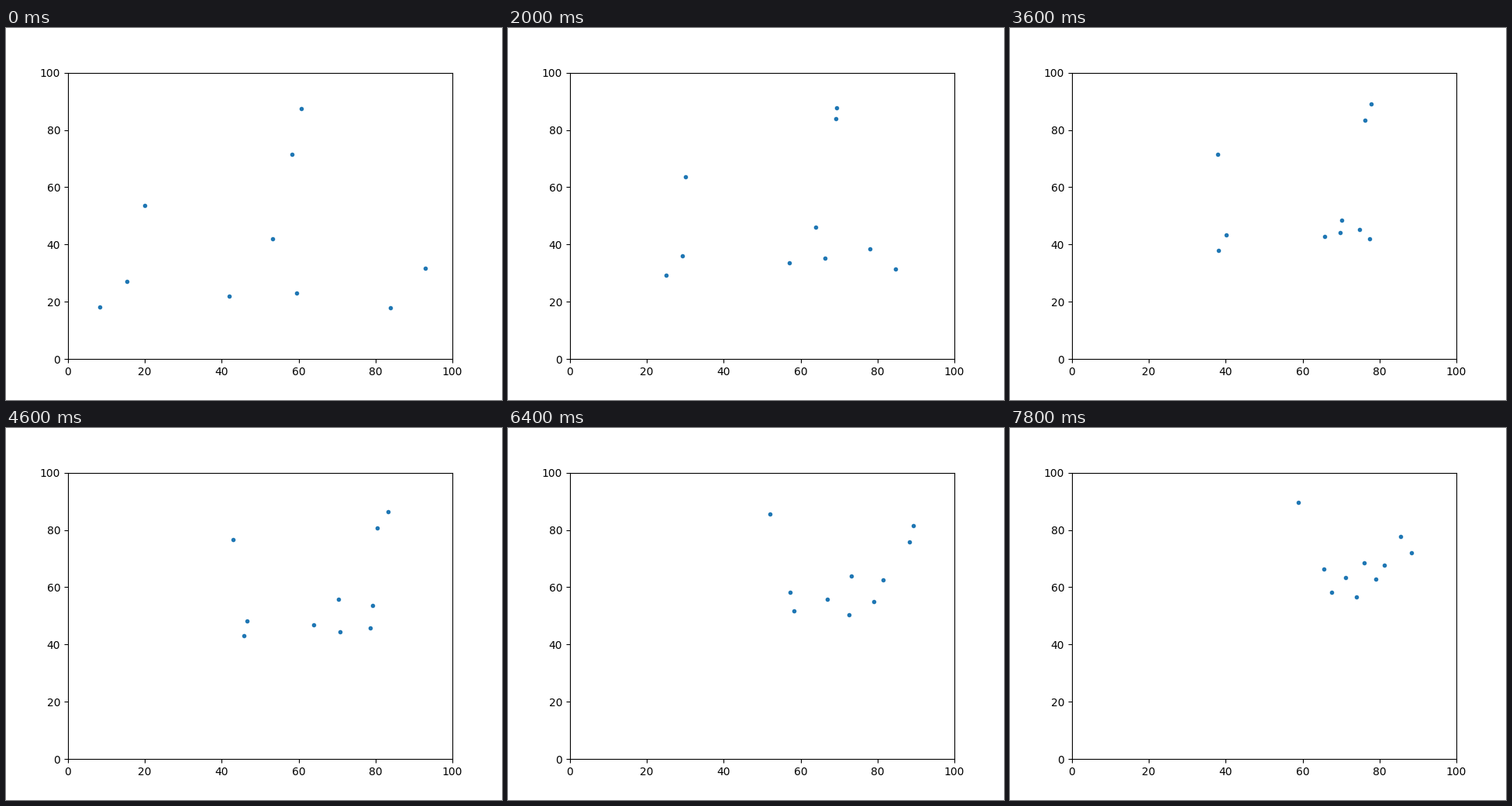
Write a matplotlib script that moves like this. It is 640 px wide and 480 px high and loops after 8000 ms.

```python
import numpy as np
import matplotlib.pyplot as plt
from matplotlib.animation import FuncAnimation

FRAMES = 40
STEP_MS = 200
STEPS = np.arange(FRAMES)
WALL = 90.6       # birds turn back here, short of the frame
REBOUND = 0.54    # speed per step after turning back


def glide(start, velocity):
    """Straight flight that turns back slowly at the wall, per axis."""
    start, velocity = np.array(start), np.array(velocity)
    ahead = start + velocity * STEPS[:, None]
    late = np.maximum(ahead - WALL, 0) / velocity
    return np.minimum(ahead, WALL) - REBOUND * late


def curve(steps, points):
    """Smooth flight through a few points, sampled at every step."""
    steps, points = np.array(steps), np.array(points)
    slopes = np.gradient(points, steps, axis=0)
    i = np.clip(np.searchsorted(steps, STEPS, side="right") - 1, 0, len(steps) - 2)
    h = (steps[i + 1] - steps[i])[:, None]
    u = (STEPS - steps[i])[:, None] / h
    ease = u * u * (3 - 2 * u)
    bend = u * (1 - u) * h * ((1 - u) * slopes[i] - u * slopes[i + 1])
    return points[i] + ease * (points[i + 1] - points[i]) + bend


# Three birds that fly on their own.
loners = [
    glide((19.97, 53.52), (1, 1)),
    glide((58.27, 71.48), (1.09, 1.25)),
    glide((60.69, 87.45), (0.86, 0.65)),
]

# A pair that comes in from the left.
PAIR_STEPS = (0, 23, 39)
pair = [
    curve(PAIR_STEPS, [(8.3, 18.2), (45.8, 43.1), (67.5, 58.2)]),
    curve(PAIR_STEPS, [(15.3, 27.1), (46.6, 48.2), (65.5, 66.3)]),
]

# Five birds that gather, push apart and drift up together.
FLOCK_STEPS = (0, 10, 18, 23, 39)
flock = [curve(FLOCK_STEPS, points) for points in (
    [(42.0, 22.1), (57.1, 33.6), (65.7, 42.8), (63.9, 46.9), (71.2, 63.4)],
    [(53.2, 42.0), (63.9, 46.0), (70.2, 48.5), (70.4, 55.8), (76.0, 68.5)],
    [(59.5, 23.1), (66.3, 35.2), (69.8, 44.2), (70.8, 44.4), (74.0, 56.6)],
    [(83.9, 17.9), (84.7, 31.4), (77.4, 42.0), (78.6, 45.8), (79.0, 62.8)],
    [(92.9, 31.7), (78.0, 38.5), (74.8, 45.2), (79.2, 53.6), (81.3, 67.7)],
)]

paths = np.array(loners + pair + flock)

fig, ax = plt.subplots(figsize=(6.4, 4.8), dpi=100)
ax.set_xlim(0, 100)
ax.set_ylim(0, 100)
birds, = ax.plot([], [], ".", color="tab:blue")


def update(step):
    birds.set_data(*paths[:, step].T)
    return birds,


anim = FuncAnimation(fig, update, frames=FRAMES, interval=STEP_MS,
                     repeat=True, repeat_delay=0)
plt.show()
```
